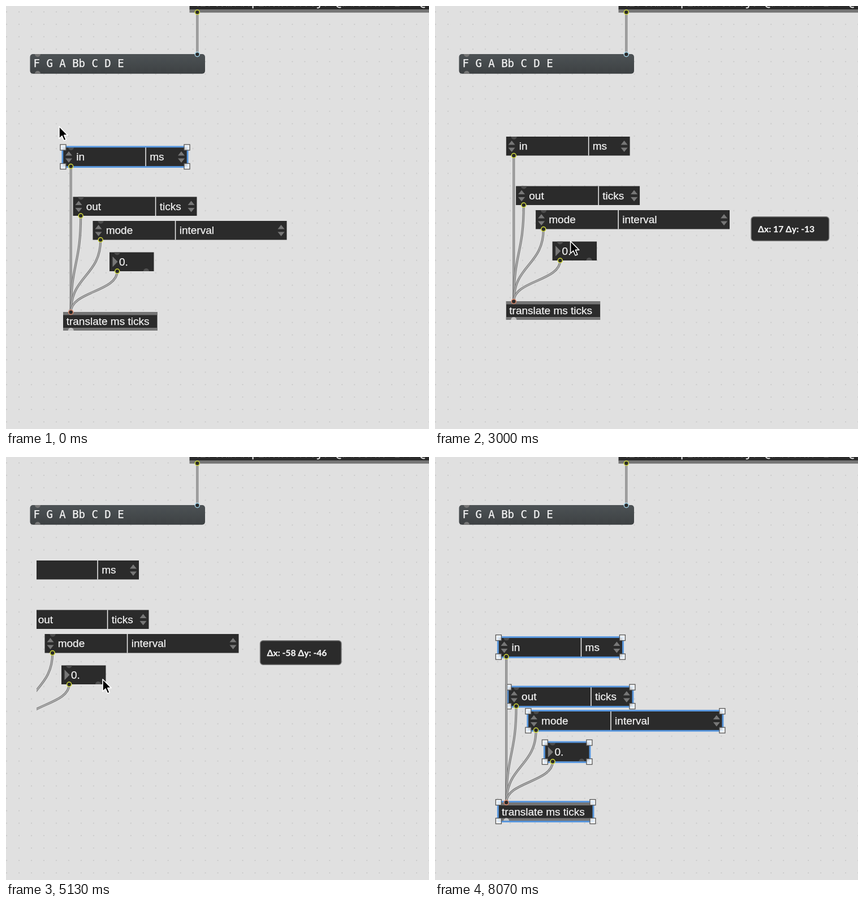
An HTML page for the animation above (8340 ms loop, 748x748 px).

```html
<!DOCTYPE html>
<html lang="en">
<head>
<meta charset="utf-8">
<title>Dragging patcher objects</title>
<style>
  html, body { margin: 0; width: 100%; height: 100%; overflow: hidden; background: #e0e0e0; }
  svg { display: block; width: 748px; height: 748px; }
  text { fill: #f4f4f4; stroke: #f4f4f4; stroke-width: .25; white-space: pre; }
  .label { font: 19px "Liberation Sans", Arial, sans-serif; }
  .mono { font: 19px "DejaVu Sans Mono", monospace; }
  .tip { font: 700 15.7px Lato, "Open Sans", sans-serif; }
</style>
</head>
<body>
<svg id="stage" viewBox="0 0 748 748">
  <defs>
    <pattern id="grid" width="21.97" height="21.97" patternUnits="userSpaceOnUse">
      <circle cx="1.1" cy="10.4" r=".9" fill="#bebebe"/>
    </pattern>
    <linearGradient id="steel" x2="0" y2="1">
      <stop stop-color="#4d5255"/><stop offset="1" stop-color="#3d4143"/>
    </linearGradient>
    <clipPath id="damage"><path id="damagePath"/></clipPath>
  </defs>
  <rect width="748" height="748" fill="#e0e0e0"/>
  <rect width="748" height="748" fill="url(#grid)"/>
  <g id="fixed"></g>
  <g id="clipper"><g id="patch"></g></g>
  <rect id="lasso" fill="#777" fill-opacity=".12" stroke="#888"/>
  <g id="tip">
    <rect y=".5" height="42.5" rx="5" fill="#2b2b2b" stroke="#777" stroke-width="1.5"/>
    <text class="tip" x="12" y="28"></text>
  </g>
  <path id="cursor" d="M0 0V21.5L5 16.8L8.6 25L12.2 23.4L8.7 15.4H15.2Z"
        fill="#000" stroke="#fff" stroke-width="1.6" stroke-linejoin="round"/>
</svg>
<script>
const LOOP = 8340, STEP = 1000 / 15, UNIT = 1.465;
const GRAB = 19, DROP = 110;
const DARK = '#2b2b2b', GREY = '#757575', YELLOW = '#d6df3c';
const $ = id => document.getElementById(id);

// Eased moves of the group; a swing adds a sideways bulge and an up-down wave
const moves = [
  { from: 20, to: 25, end: [140, -25] },
  { from: 25, to: 43, end: [24.6, -19], swing: [-80, -150] },
  { from: 45, to: 58, end: [27, -112], swing: [130, 130] },
  { from: 58, to: 61, end: [-45, -77] },
  { from: 61, to: 75, end: [-47, -104], swing: [215, 80] },
  { from: 76, to: 77, end: [-85, -67] },
  { from: 77, to: 88, end: [200, -20], swing: [0, 60] },
  { from: 88, to: 98, end: [206, 47], swing: [-90, -130] },
  { from: 100, to: 109, end: [11.4, 69.6], swing: [0, 50] }
];
// Pointer relative to the dragged group: step, x, y
const hand = [
  [0, 94, 213], [2, 84, 212], [10, 544, 621], [15, 228, 405],
  [25, 248, 366], [45, 215, 435], [60, 222, 433], [77, 256, 460], [100, 200, 350]
];

const mix = (a, b, u) => a + (b - a) * u;

function groupAt(n) {
  let x = 0, y = 0;
  for (const { from, to, end, swing = [0, 0] } of moves) {
    if (n <= from) break;
    const u = Math.min(1, (n - from) / (to - from)), ease = u * u * (3 - 2 * u);
    x = mix(x, end[0], ease) + swing[0] * Math.sin(Math.PI * u) ** 2;
    y = mix(y, end[1], ease) + swing[1] * Math.sin(2 * Math.PI * u);
  }
  return [x, y];
}

function handAt(n) {
  const i = hand.findIndex(key => key[0] > n);
  if (i < 0) return hand[hand.length - 1].slice(1);
  const [a, ax, ay] = hand[i - 1], [b, bx, by] = hand[i], u = (n - a) / (b - a);
  return [mix(ax, bx, u), mix(ay, by, u)];
}

const set = (el, attrs) => { for (const key in attrs) el.setAttribute(key, attrs[key]); };

function add(parent, tag, attrs, content) {
  const el = document.createElementNS('http://www.w3.org/2000/svg', tag);
  set(el, attrs);
  if (content) el.textContent = content;
  parent.appendChild(el);
  return el;
}
const box = (p, x, y, width, height, fill, more) => add(p, 'rect', { x, y, width, height, fill, ...more });
const label = (p, x, y, s, cls = 'label') => add(p, 'text', { x, y, class: cls }, s);
const path = (p, d, fill) => add(p, 'path', { d, fill });
const ring = (p, cx, cy, stroke) => add(p, 'circle', { cx, cy, r: 4, fill: DARK, stroke, 'stroke-width': 1.5 });
// Half disc hanging below (sweep 0) or standing above (sweep 1) an edge
const port = (p, x, y, sweep, fill) => path(p, `M${x - 5} ${y}A5 5 0 0 ${sweep} ${x + 5} ${y}Z`, fill);

function cord(p, x1, y1, x2, y2) {
  const m = (y1 + y2) / 2, d = `M${x1} ${y1}C${x1} ${m} ${x2} ${m} ${x2} ${y2}`;
  for (const [stroke, w] of [['#767676', 4], ['#adadad', 2]])
    add(p, 'path', { d, fill: 'none', stroke, 'stroke-width': w });
}

function arrows(p, x, y) {
  path(p, `M${x - 6} ${y + 14.5}L${x} ${y + 7}L${x + 6} ${y + 14.5}Z`, '#777');
  path(p, `M${x - 6} ${y + 19.5}L${x} ${y + 27}L${x + 6} ${y + 19.5}Z`, '#777');
}

function attribute(p, { x, y, w, h }, name, value) {
  box(p, x, y, w, h, DARK);
  port(p, x + 14, y, 0, '#4c4c4c');
  arrows(p, x + 10, y);
  arrows(p, x + w - 10, y);
  box(p, x + 145.3, y, 1.5, h, '#f0f0f0');
  label(p, x + 23.2, y + 23.3, name);
  label(p, x + 153.2, y + 23.3, value);
}

function selection(p, { x, y, w, h }) {
  const g = add(p, 'g', {});
  box(g, x - 1.1, y - 1.1, w + 2.2, h + 2.2, 'none', { stroke: '#5596e0', 'stroke-width': 2.8 });
  for (const cx of [x, x + w]) for (const cy of [y, y + h])
    box(g, cx - 5, cy - 5, 10, 10, '#fff', { 'fill-opacity': .8, stroke: '#555', 'stroke-width': 1.3 });
  return g;
}

const inBox = { x: 101, y: 250, w: 219, h: 33.5 };
const outBox = { x: 118.5, y: 337.5, w: 219, h: 33.5 };
const modeBox = { x: 153.5, y: 380, w: 343, h: 33.5 };
const numBox = { x: 183, y: 435.5, w: 78.5, h: 33.5 };
const objBox = { x: 101, y: 541, w: 166.5, h: 33 };
const boxes = [inBox, outBox, modeBox, numBox, objBox];

function buildFixed() {
  const g = $('fixed');
  box(g, 324.5, -20, 430, 26.5, DARK);
  label(g, 331, 0, 'list.modepin.notes.js @buttons 100 @', 'mono');
  box(g, 324.5, 6, 430, 5.7, GREY);
  box(g, 42.5, 85, 309.5, 34.7, 'url(#steel)', { rx: 5 });
  port(g, 56, 85, 0, '#777');
  port(g, 56, 119.7, 1, '#777');
  label(g, 48.5, 108, 'F G A Bb C D E', 'mono');
  cord(g, 338.3, 11, 338.3, 85);
  ring(g, 338.3, 11, YELLOW);
  ring(g, 338.3, 85.5, '#a9dcf2');
}

function buildPatch() {
  const g = $('patch');
  attribute(g, inBox, 'in', 'ms');
  attribute(g, outBox, 'out', 'ticks');
  attribute(g, modeBox, 'mode', 'interval');

  box(g, numBox.x, numBox.y, numBox.w, numBox.h, DARK);
  port(g, 196.5, 435.5, 0, '#4c4c4c');
  port(g, 248, 469, 1, '#505050');
  path(g, 'M188.5 443L197.5 452.2L188.5 461.5Z', '#777');
  label(g, 200, 458.8, '0.');

  box(g, objBox.x, objBox.y, objBox.w, objBox.h, DARK);
  box(g, objBox.x, 541, objBox.w, 5.5, GREY);
  box(g, objBox.x, 569, objBox.w, 5, GREY);
  port(g, 114.7, 574, 1, '#c4c4c4');
  label(g, 106.7, 564, 'translate ms ticks');

  const marks = boxes.map(b => selection(g, b));
  const outlets = [inBox, outBox, modeBox, numBox].map(b => [b.x + 13.7, b.y + b.h]);
  outlets.forEach(([x, y]) => cord(g, x, y, 114.7, 541));
  outlets.forEach(([x, y]) => ring(g, x, y, YELLOW));
  ring(g, 114.7, 541.5, '#e08a6c');
  return marks;
}

buildFixed();
const marks = buildPatch();
const lassoStart = [84, 212];
const [tipBox, tipText] = $('tip').children;
const show = (el, on) => el.setAttribute('visibility', on ? 'visible' : 'hidden');
const rectPath = (x, y, w, h, [dx, dy]) => `M${x + dx} ${y + dy}h${w}v${h}h${-w}z`;

// Only areas the group covered in the previous two steps get repainted
function damage(n) {
  const last = groupAt(n - 1);
  return rectPath(101, 250, 395.5, 324, groupAt(n - 2)) +
    boxes.map(b => rectPath(b.x, b.y, b.w, b.h, last)).join('');
}

function selected(b, i, n, px, py) {
  if (n < 2) return i === 0;
  if (n <= 10) return n > 2 && b.x < px && b.y < py;
  return n <= GRAB || n >= DROP;
}

function draw(ms) {
  const n = Math.floor((ms % LOOP + 4) / STEP);
  const [dx, dy] = groupAt(n), [hx, hy] = handAt(n);
  const px = hx + dx, py = hy + dy;
  const dragging = n > GRAB && n < DROP;
  const move = (id, x, y) => $(id).setAttribute('transform', `translate(${x} ${y})`);

  move('patch', dx, dy);
  if (dragging) {
    $('damagePath').setAttribute('d', damage(n));
    $('clipper').setAttribute('clip-path', 'url(#damage)');
    tipText.textContent = `Δx: ${Math.round(dx / UNIT)} Δy: ${Math.round(dy / UNIT)}`;
    tipBox.setAttribute('width', tipText.getComputedTextLength() + 37.5);
    move('tip', 534.5 + dx, 391.3 + dy);
  } else {
    $('clipper').removeAttribute('clip-path');
  }
  show($('tip'), dragging);
  marks.forEach((mark, i) => show(mark, selected(boxes[i], i, n, px, py)));

  const [lx, ly] = lassoStart, lassoing = n > 2 && n <= 10;
  show($('lasso'), lassoing);
  if (lassoing) set($('lasso'), { x: lx, y: ly, width: px - lx, height: py - ly });

  show($('cursor'), n <= DROP);
  move('cursor', px, py);
}

const start = performance.now();
function tick() {
  draw(performance.now() - start);
  requestAnimationFrame(tick);
}
tick();
</script>
</body>
</html>
```
